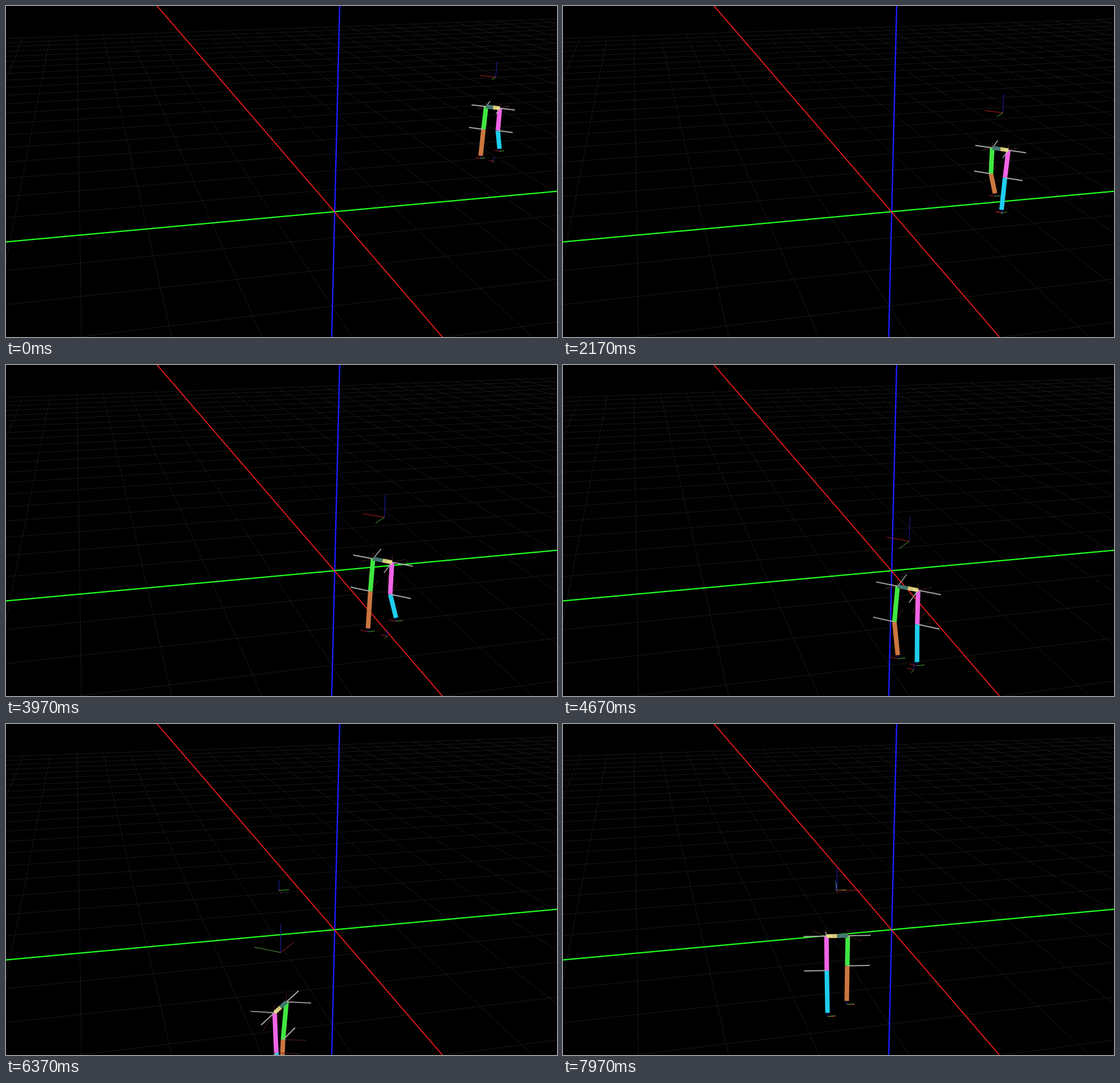
An HTML page with a canvas for the animation above (8000 ms loop, 966x580 px).

```html
<!DOCTYPE html>
<html lang="en">
<head>
<meta charset="utf-8">
<title>Walking legs</title>
<style>
  html, body { margin: 0; width: 100%; height: 100%; overflow: hidden; background: #000; }
  canvas { display: block; }
</style>
</head>
<body>
<canvas id="stage" width="966" height="580"></canvas>
<script>
const ctx = document.getElementById('stage').getContext('2d');
const LOOP = 8000;

// World: x along the green axis, y along the red axis (away), z up.
function project([x, y, z]) {
  const depth = 0.001894 + 0.0000342 * x + 0.0001394 * y;
  const w = depth - 0.0000473 * z;
  return [
    (120.5 * depth + 0.8613 + 0.2115 * x - 0.0227 * z) / w,
    (1 - 168 * depth - 0.2102 * z) / w
  ];
}

function stroke(a, b, color, width) {
  ctx.strokeStyle = color;
  ctx.lineWidth = width;
  ctx.beginPath();
  ctx.moveTo(...a);
  ctx.lineTo(...b);
  ctx.stroke();
}

const line = (a, b, color, width = 1) => stroke(project(a), project(b), color, width);
const shift = (p, dir, k) => p.map((v, i) => v + dir[i] * k);
const mix = (p, q) => p.map((v, i) => (v + q[i]) / 2);

const RED = '#b02020', GREEN = '#56a83e', BLUE = '#2020b4';
const BAR = '#a6a6a6', DIM = '#562224';
const UP = [0, 0, 1], EAST = [1, 0, 0];

// time, x, y, heading in degrees, gait phase in cycles, stride strength
const KEYS = [
  [0, 3.729, 1.834, -133, 0.2, 1],
  [1470, 2.321, 0.32, -133, 1.18, 1],
  [2870, 0.929, -1.197, -133, 2.22, 1],
  [3970, -0.145, -2.379, -133, 3.21, 1],
  [5330, -1.498, -3.87, -133, 4.28, 1],
  [5780, -1.95, -4.34, -146, 4.66, 0.7],
  [6030, -2.045, -4.47, -177, 4.88, 0.4],
  [6370, -2.013, -4.425, -221, 5.15, 0.35],
  [6850, -1.89, -4.03, -268, 5.48, 0.6],
  [7500, -1.67, -3.28, -280, 5.82, 0.7],
  [8000, -1.555, -2.57, -281, 6.14, 0.55]
];

function slope(i, c) {
  const a = KEYS[Math.max(i - 1, 0)], b = KEYS[Math.min(i + 1, KEYS.length - 1)];
  return (b[c] - a[c]) / (b[0] - a[0]);
}

function sample(t) {
  let i = 0;
  while (i < KEYS.length - 2 && t >= KEYS[i + 1][0]) i++;
  const a = KEYS[i], b = KEYS[i + 1], span = b[0] - a[0];
  const u = (t - a[0]) / span, v = 1 - u;
  return a.slice(1).map((start, k) => {
    const c = k + 1;
    return v * v * (1 + 2 * u) * start + u * u * (3 - 2 * u) * b[c]
      + span * u * v * (v * slope(i, c) - u * slope(i + 1, c));
  });
}

function legAngles(phase, strength) {
  const p = phase - Math.floor(phase), rad = Math.PI / 180;
  const thigh = (4 + 22 * Math.cos(2 * Math.PI * (p - 0.98))) * strength;
  const bend = 3 + 30 * Math.exp(-(((p - 0.7) / 0.11) ** 2)) * strength;
  return [thigh * rad, (thigh - bend) * rad];
}

function segment(from, forward, angle, length) {
  return shift(shift(from, forward, Math.sin(angle) * length), UP, -Math.cos(angle) * length);
}

function drawGrid() {
  const shade = ctx.createLinearGradient(0, 20, 0, 580);
  shade.addColorStop(0, '#1c1c22');
  shade.addColorStop(0.35, '#1a1a1b');
  shade.addColorStop(1, '#1d1d14');
  ctx.setLineDash([5, 1]);
  for (let n = -20; n <= 20; n++) {
    if (n > -8 && n) line([-14, n, 0], [20, n, 0], shade);
    if (n) line([n, -7, 0], [n, 20, 0], shade);
  }
  ctx.setLineDash([]);
}

function drawAxes() {
  stroke([584.5, -1], [570.5, 580], '#1c1cff', 2.4);
  stroke([-1, 413], [966, 324], '#20ff20', 2.2);
  stroke([264, -1], [765, 580], '#ff1c1c', 1.7);
}

function triad(at, axes, size) {
  [RED, GREEN, BLUE].forEach((color, i) => line(at, shift(at, axes[i], size), color));
}

function drawLeg(leg, outward, forward) {
  const { hip, knee, ankle, side } = leg;
  const back = forward.map(v => -v);
  line(hip, shift(shift(hip, outward, 0.17), UP, -side * 0.07), DIM);
  line(hip, shift(shift(hip, forward, 0.14), UP, -0.24), DIM);
  line(hip, shift(hip, UP, 0.09), DIM);
  line(knee, shift(shift(knee, back, 0.26), UP, 0.06), DIM);
  line(knee, ankle, leg.shank, 8);
  line(hip, knee, leg.thigh, 8);
  line(hip, shift(hip, outward, 0.28), BAR, 2);
  line(hip, shift(shift(hip, forward, -side * 0.27), UP, side * 0.05), BAR, 1.6);
  line(knee, shift(knee, outward, 0.28), BAR, 2);
}

function drawWalker(t) {
  const [x, y, degrees, phase, strength] = sample(t);
  const turn = degrees * Math.PI / 180;
  const forward = [Math.cos(turn), Math.sin(turn), 0];
  const right = [forward[1], -forward[0], 0];
  const axes = [right, forward, UP];

  const legs = [
    { side: 1, cycle: phase, thigh: '#40e840', shank: '#cc7640' },
    { side: -1, cycle: phase + 0.5, thigh: '#f264e6', shank: '#20ccec' }
  ];
  for (const leg of legs) {
    const [thigh, shank] = legAngles(leg.cycle, strength);
    leg.hip = shift([x, y, 1.06], right, leg.side * 0.13);
    leg.knee = segment(leg.hip, forward, thigh, 0.435);
    leg.ankle = segment(leg.knee, forward, shank, 0.515);
  }

  triad([x, y, 1.64], axes, 0.29);
  if (t < 5850) triad([x + 0.1, y - 0.03, 0], axes, 0.09);
  for (const leg of legs) {
    triad(shift(leg.ankle, UP, -0.05), [right, EAST, UP], 0.1);
    drawLeg(leg, right.map(v => v * leg.side), forward);
  }
  const [g, m] = legs.map(leg => leg.hip), middle = mix(g, m);
  line(middle, m, '#d8c878', 7);
  line(g, middle, '#44766e', 7);
  line(mix(middle, m), m, '#f0e4a0', 2);
}

function drawMarker() {
  stroke([478, 291], [478, 274], BLUE, 1.2);
  stroke([478, 291], [483, 297], RED, 1);
  stroke([478, 291], [496, 290], '#38c038', 1.2);
}

// Centre thin lines on pixels.
ctx.translate(0.5, 0.5);

const began = performance.now();
function frame(now) {
  const t = Math.max(0, now - began) % LOOP;
  ctx.fillStyle = '#000';
  ctx.fillRect(-1, -1, 968, 582);
  drawGrid();
  drawAxes();
  if (t >= 5870) drawMarker();
  drawWalker(t);
  requestAnimationFrame(frame);
}
frame(began);
</script>
</body>
</html>
```
